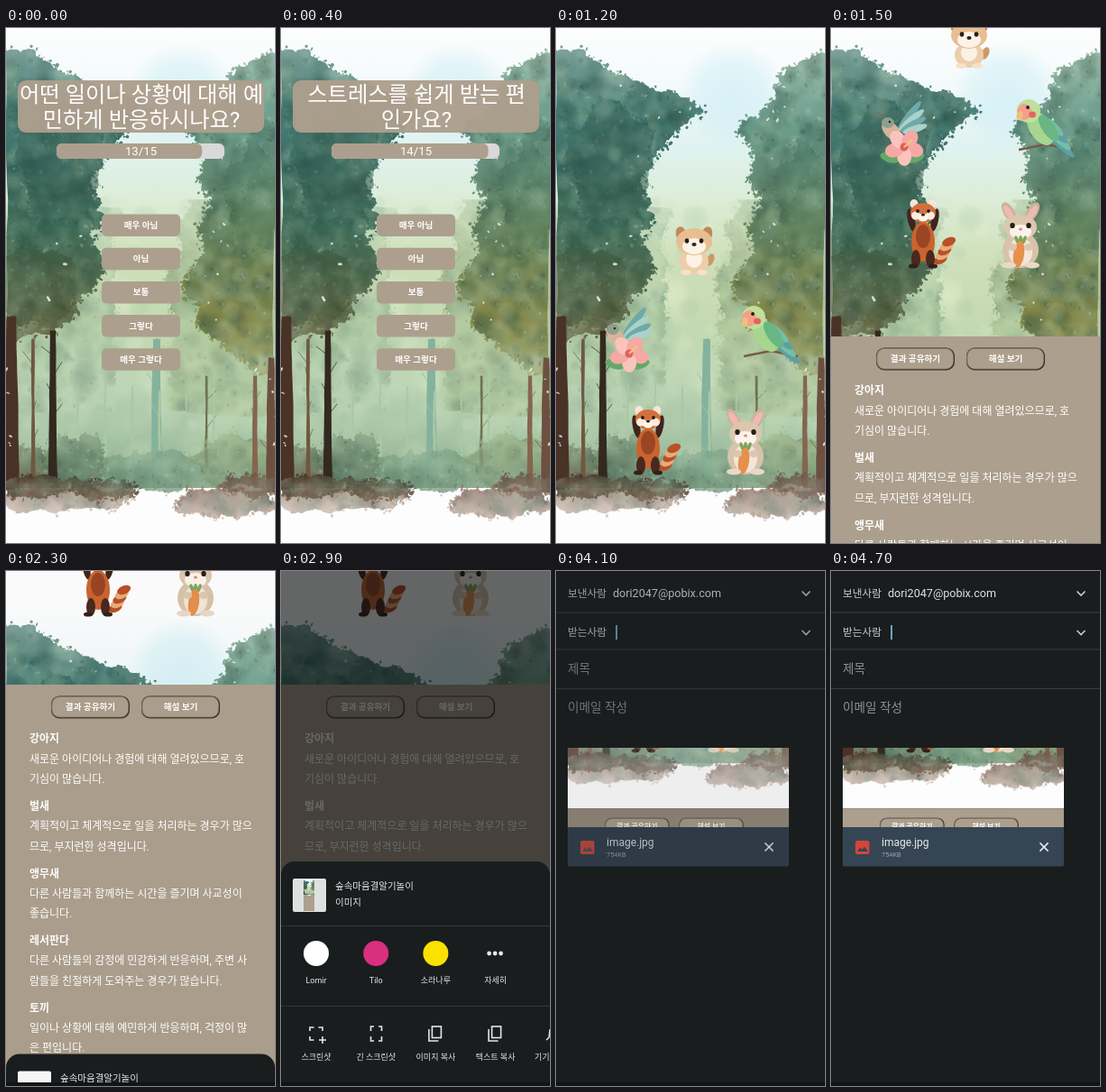
These frames come from a looping animation (298 by 571 pixels, 4800 ms). An HTML page with a canvas:

```html
<!DOCTYPE html>
<html lang="ko">
<head>
<meta charset="utf-8">
<style>
html, body { margin: 0; width: 100%; height: 100%; overflow: hidden; background: #fff; }
canvas { display: block; width: 298px; height: 571px; }
</style>
</head>
<body>
<canvas id="stage" width="298" height="571"></canvas>
<script>
const W = 298, H = 571, LOOP = 4800;
const stage = document.getElementById('stage').getContext('2d');
let g = stage;
const FONT = "Roboto, 'Noto Sans CJK KR', 'Noto Sans CJK', 'Noto Sans CJK JP', sans-serif";
const BEIGE = '#ad9f8d', DARK = '#191d1e', PAPER = '#fdfdfd';

let seed = 7;
function rnd(a = 0, b = 1) {
  seed = (seed + 0x6D2B79F5) | 0;
  let v = Math.imul(seed ^ (seed >>> 15), 1 | seed);
  v = (v + Math.imul(v ^ (v >>> 7), 61 | v)) ^ v;
  return a + (b - a) * (((v ^ (v >>> 14)) >>> 0) / 4294967296);
}
const pick = list => list[Math.floor(rnd(0, list.length))];
const clamp = v => Math.max(0, Math.min(1, v));
const inOut = p => p < .5 ? 2 * p * p : 1 - 2 * (1 - p) * (1 - p);
const bump = (y, mid, spread) => Math.exp(-(((y - mid) / spread) ** 2));

// drawing helpers
function box(x, y, w, h, r, fill) {
  g.fillStyle = fill;
  g.beginPath();
  g.roundRect(x, y, w, h, r);
  g.fill();
}
function oval(x, y, rx, ry, fill, rot = 0) {
  g.fillStyle = fill;
  g.beginPath();
  g.ellipse(x, y, rx, ry, rot, 0, 7);
  g.fill();
}
function pair(x, dx, y, rx, ry, fill, rot = 0) {
  oval(x - dx, y, rx, ry, fill, -rot);
  oval(x + dx, y, rx, ry, fill, rot);
}
function trace(pts) {
  g.beginPath();
  pts.forEach(([x, y]) => g.lineTo(x, y));
}
function line(pts, color, width = 1.6) {
  g.strokeStyle = color;
  g.lineWidth = width;
  trace(pts);
  g.stroke();
}
function shape(pts, fill) {
  g.fillStyle = fill;
  trace(pts);
  g.fill();
}
function text(s, x, y, size, color = '#fff', align = 'left', weight = 400) {
  g.font = `${weight} ${size}px ${FONT}`;
  g.textAlign = align;
  g.fillStyle = color;
  g.fillText(s, x, y + size * .36);
}
function gradient(y1, y2, colors) {
  const fill = g.createLinearGradient(0, y1, 0, y2);
  colors.forEach((c, i) => fill.addColorStop(i / (colors.length - 1), c));
  return fill;
}

// watercolour helpers
function rough(pts, amp, depth = 4) {
  for (let d = 0; d < depth; d++, amp *= .6) {
    pts = pts.flatMap((p, i) => {
      const q = pts[(i + 1) % pts.length];
      return [p, [(p[0] + q[0]) / 2 + rnd(-amp, amp), (p[1] + q[1]) / 2 + rnd(-amp, amp)]];
    });
  }
  return pts;
}
function soft(x, y, r, rgb, alpha) {
  const fill = g.createRadialGradient(x, y, 0, x, y, r);
  fill.addColorStop(0, `rgba(${rgb},${alpha})`);
  fill.addColorStop(.6, `rgba(${rgb},${alpha * .7})`);
  fill.addColorStop(1, `rgba(${rgb},0)`);
  oval(x, y, r, r, fill);
}
function wash(pts, colors, alpha = 1, amp = 5) {
  const edge = rough(pts, amp);
  const xs = pts.map(p => p[0]), ys = pts.map(p => p[1]);
  const x1 = Math.min(...xs), x2 = Math.max(...xs), y1 = Math.min(...ys), y2 = Math.max(...ys);
  const fill = gradient(y1, y2, colors);
  const count = (x2 - x1) * (y2 - y1) / 70;
  g.save();
  g.globalAlpha = alpha;
  shape(edge, fill);
  for (const [x, y] of edge) {
    if (rnd() < .4) oval(x + rnd(-4, 4), y + rnd(-4, 4), rnd(.5, 2.8), rnd(.5, 1.8), fill, rnd(0, 3));
  }
  trace(edge);
  g.clip();
  for (let i = 0; i < count; i++) {
    const x = rnd(x1, x2), y = rnd(y1, y2);
    soft(x, y, rnd(4, 16), pick(['22,62,58', '38,66,48', '190,215,190', '140,175,145']), rnd(.04, .2));
    if (i % 3 === 0) oval(x, y, rnd(.6, 3), rnd(.5, 2), pick(['rgba(20,60,55,.22)', 'rgba(200,222,200,.25)']), rnd(0, 3));
  }
  g.restore();
}
function blob(x, y, rx, ry) {
  return Array.from({ length: 14 }, (_, i) => {
    const a = i * Math.PI / 7, k = 1 + .14 * Math.sin(a * 5 + x);
    return [x + rx * k * Math.cos(a), y + ry * k * Math.sin(a)];
  });
}
// crown hanging in from one side; reach gives its width at each height
function crown(side, y1, y2, reach) {
  const pts = [[side, y1]];
  for (let y = y1; y <= y2; y += 9) pts.push([Math.abs(side - Math.max(0, reach(y))), y]);
  return [...pts, [side, y2]];
}
const dome = (y, y1, y2, round) =>
  Math.min(1, Math.sqrt(Math.max(0, y - y1) / round), Math.sqrt(Math.max(0, y2 - y) / round));
const leftReach = y => 100 * dome(y, 24, 350, 60) + 60 * bump(y, 95, 30) + 7 * Math.sin(y / 10);
const rightReach = y => 74 * dome(y, 26, 385, 80) + 22 * bump(y, 300, 60) + 14 * bump(y, 120, 35) + 7 * Math.sin(y / 9 + 2);

function trunk(x, y1, y2, w, color) {
  shape(rough([[x - w * .35, y1], [x + w * .35, y1], [x + w * .6, y2], [x - w * .6, y2]], 1), color);
  for (let y = y1 + 20; y < y2 - 40; y += rnd(18, 34)) {
    line([[x, y + 8], [x + rnd(-14, 14), y - rnd(2, 9)]], color, .7);
  }
}

function paintForest() {
  const sheet = document.createElement('canvas');
  sheet.width = W;
  sheet.height = H;
  g = sheet.getContext('2d');
  g.fillStyle = PAPER;
  g.fillRect(0, 0, W, H);
  g.fillStyle = gradient(0, 520, [PAPER, '#f3fafb', '#e0f3f1', '#dbecd6', '#cfdfb9', '#c3d9b2', '#bad3b2', '#a5c3a4', '#8ba68c']);
  g.fillRect(0, 0, W, 510);
  soft(195, 75, 60, '200,236,244', .6);
  for (let i = 0; i < 150; i++) {
    soft(rnd(0, W), rnd(190, 490), rnd(8, 26), pick(['240,246,215', '150,188,145', '200,224,190']), rnd(.08, .25));
  }

  // hazy far foliage
  wash(crown(0, 200, 430, y => leftReach(Math.min(y, 250)) + 22), ['#bdd6b4', '#a9c8a0', '#c2d8b8'], .45);
  wash(crown(W, 190, 430, y => rightReach(Math.min(y, 300)) + 24), ['#bfd3ab', '#a3ba86', '#bccfa2'], .5);

  // far and near trunks: place, top, width
  trunk(167, 345, 498, 11, '#84b29d');
  trunk(222, 385, 492, 4, '#6d7350');
  for (let i = 0; i < 6; i++) trunk(80 + 30 * i, rnd(370, 410), 475, 2.5, '#a9c8a6');

  wash(blob(75, 478, 36, 28), ['#8ba787', '#4f6a52'], .8);
  wash(blob(165, 492, 60, 22), ['#93b799', '#75997c'], .7);
  wash(blob(262, 482, 52, 32), ['#a3b88a', '#7f9a78'], .7);
  wash(blob(18, 485, 30, 22), ['#8f9c77', '#5d5a42'], .8);

  wash(crown(0, 25, 349, leftReach), ['#7ba199', '#4b8078', '#3a6c64', '#3c6a58', '#52694a', '#6d6a48']);
  wash(blob(60, 150, 48, 70), ['#2d5f5a', '#2f5a4c'], .5);
  wash(blob(30, 285, 48, 42), ['#3a5a42', '#55532f'], .5);
  wash(crown(W, 28, 384, rightReach), ['#9fc0b2', '#6c9e8e', '#648c74', '#728c60', '#828648', '#a0a870']);
  wash(blob(274, 190, 32, 62), ['#46786a', '#5d7a4c'], .45);

  trunk(6, 320, 512, 15, '#4a3226');
  trunk(30, 345, 505, 5, '#705840');
  trunk(52, 335, 505, 9, '#33291f');
  trunk(276, 385, 508, 6, '#846650');
  trunk(294, 365, 515, 9, '#6d5040');

  // torn lower edge and bare earth
  const foot = [[0, 600]];
  for (let x = 0; x <= W; x += 18) foot.push([x, 514 + 6 * Math.sin(x / 24)]);
  shape(rough([...foot, [W, 600]], 5), PAPER);
  wash(blob(60, 522, 80, 13), ['#9a7f6e', '#c9b6aa'], .75);
  wash(blob(42, 508, 62, 12), ['#4a382c', '#6b5342'], .85);
  wash(blob(112, 512, 34, 9), ['#4e5040', '#79604e'], .8);
  wash(blob(245, 526, 58, 17), ['#86695b', '#c9b0a6'], .75);
  wash(blob(276, 508, 38, 11), ['#6f5546', '#947769'], .75);

  for (let i = 0; i < 45; i++) {
    const y = rnd(60, 500), reach = i % 2 ? leftReach(y) : rightReach(y);
    const d = reach * rnd(.5, 1);
    oval(i % 2 ? d : W - d, y, rnd(.5, 2.6), rnd(.4, 1.6), 'rgba(243,249,245,.8)', rnd(0, 3));
  }
  return sheet;
}

// animals, each around its own centre
function dog() {
  oval(18, 14, 4, 7, '#c99a68', .4);
  oval(0, 16, 16, 14, '#ecceaa');
  oval(0, 13, 9, 10, '#fbf1e4');
  pair(0, 14, -14, 6, 9, '#c08a58', .3);
  oval(0, -6, 20, 15, '#e7bf92');
  oval(0, -1, 13, 9, '#fcf3e8');
  pair(0, 8, -7, 2.3, 2.7, '#2b1c16');
  oval(0, -3, 2.6, 1.9, '#33211b');
  pair(0, 9, 28, 6, 3, '#f6e2c8');
}
function hummingbird() {
  line([[-24, -26], [-14, -18]], '#7c6b5c', 1.2);
  for (let i = 0; i < 4; i++) oval(12 + i * 2, -22 + i * 5, 20 - i * 2, 4, i % 2 ? '#a9d2cb' : '#6fa9a8', -.9 + i * .2);
  oval(-8, -5, 13, 8, '#d6b49a', .8);
  oval(-12, -14, 7, 6, '#8f9f8c');
  oval(-10, -15, 1.2, 1.2, '#1d1d1d');
  pair(4, 14, 25, 11, 5, '#64a868', -.3);
  for (let i = 0; i < 5; i++) {
    const a = i * 1.257 + .3;
    oval(6 + 11 * Math.cos(a), 13 + 10 * Math.sin(a), 11, 8, i % 2 ? '#fac3bb' : '#f5a8a4', a);
  }
  oval(6, 13, 4.5, 4.5, '#dd6068');
  line([[6, 13], [15, 5]], '#f2cf6a', 2);
}
function parrot() {
  line([[-30, 22], [0, 16], [30, 22]], '#7a5b45', 2.5);
  for (let i = 0; i < 4; i++) oval(14 - i * 2, 14 - i * 6, 24 - i * 3, 4.5, i % 2 ? '#74bfa4' : '#5a9fa8', .75);
  oval(-6, -2, 12, 21, '#a8d690', -.55);
  oval(3, -2, 7, 17, '#69b684', -.6);
  oval(-19, -21, 13, 13, '#bfe09a');
  oval(-24, -20, 8, 9, '#f3a08a');
  oval(-29, -16, 3.5, 5, '#ecc07c', .3);
  oval(-15, -17, 4, 3.5, '#e6635d');
  oval(-20, -25, 1.9, 2.1, '#1f1c1c');
}
function panda() {
  for (let i = 0; i < 5; i++) oval(17 + 2.4 * i, 28 - 5 * i, 8, 4.5, i % 2 ? '#e9ac77' : '#b8502a', -.4);
  pair(-2, 13, -16, 4, 13, '#3f241d', .2);
  oval(-2, 8, 13, 22, '#c9642f');
  oval(-2, 2, 8, 13, '#9a4524');
  pair(-2, 8, 27, 5, 10, '#4a281d');
  pair(-2, 11, 35, 5, 2.6, '#33201b');
  pair(-2, 10, -34, 4.5, 5, '#f6e6d8');
  oval(-2, -24, 14, 11, '#d1703c');
  pair(-2, 8, -21, 5, 4.5, '#f9ecdf');
  oval(-2, -19, 5.5, 4.5, '#fdf4ea');
  pair(-2, 6, -26, 1.8, 2, '#241512');
  oval(-2, -22, 2, 1.5, '#241512');
}
function rabbit() {
  pair(0, 13, -27, 6, 12, '#cdb39a', .55);
  pair(0, 13, -26, 3.6, 9.5, '#f0b9b2', .55);
  oval(0, 15, 20, 20, '#d8c3aa');
  oval(0, 17, 13, 16, '#f2e6d8');
  oval(0, -10, 18, 14, '#dcc7ae');
  oval(0, -5, 12, 8, '#fbf3ea');
  pair(0, 9, -12, 2.7, 3.1, '#2a1b18');
  oval(0, -8, 2, 1.5, '#d98a86');
  for (const a of [-.4, 0, .4]) oval(a * 10, 4, 2, 5, '#7fa55c', a);
  oval(-2, 20, 6, 15, '#e6904c', .15);
  pair(0, 9, 12, 5, 4, '#dcc7ae');
  pair(0, 13, 32, 8, 3.6, '#ead9c6');
}
const animals = [[dog, 153, 243], [hummingbird, 75, 348], [parrot, 238, 342], [panda, 104, 458], [rabbit, 210, 460]];

const traits = [
  ['강아지', '새로운 아이디어나 경험에 대해 열려있으므로, 호', '기심이 많습니다.'],
  ['벌새', '계획적이고 체계적으로 일을 처리하는 경우가 많으', '므로, 부지런한 성격입니다.'],
  ['앵무새', '다른 사람들과 함께하는 시간을 즐기며 사교성이', '좋습니다.'],
  ['레서판다', '다른 사람들의 감정에 민감하게 반응하며, 주변 사', '람들을 친절하게 도와주는 경우가 많습니다.'],
  ['토끼', '일이나 상황에 대해 예민하게 반응하며, 걱정이 많', '은 편입니다.']
];
const quiz = [
  ['어떤 일이나 상황에 대해 예', '민하게 반응하시나요?'],
  ['스트레스를 쉽게 받는 편', '인가요?'],
  ['사소한 일을 할때도 걱정이', '많은 편인가요?']
];
const answers = ['매우 아님', '아님', '보통', '그렇다', '매우 그렇다'];
const forest = paintForest();
g = stage;

function quizPage(n, touch) {
  g.drawImage(forest, 0, 0);
  box(13, 58, 273, 58, 9, 'rgba(173,159,141,.96)');
  quiz[n].forEach((s, i) => text(s, 150, 73 + 28.5 * i, 24.3, '#fff', 'center'));
  box(56, 128, 186, 17, 6, '#dad8d8');
  box(56, 128, 186 * (13 + n) / 15, 17, 6, BEIGE);
  text(`${13 + n}/15`, 149.5, 136, 13.2, '#fff', 'center');
  answers.forEach((label, i) => {
    const y = 206.5 + 37.2 * i;
    box(106, y, 87, 24.5, 5, BEIGE);
    text(label, 149.5, y + 12, 9.6, '#fff', 'center', 700);
  });
  if (touch) {
    oval(172, 366, 8.5, 8.5, 'rgba(120,112,104,.25)');
    oval(172, 366, 7.5, 7.5, 'rgba(235,230,225,.5)');
  }
}

function resultPage(forestY) {
  g.fillStyle = PAPER;
  g.fillRect(0, 0, W, H);
  g.drawImage(forest, 0, forestY);
  for (const [animal, x, y] of animals) {
    g.save();
    g.translate(x, y);
    animal();
    g.restore();
  }
  g.fillStyle = BEIGE;
  g.fillRect(0, H, W, 600);
  ['결과 공유하기', '해설 보기'].forEach((label, i) => {
    const x = 50 + 100 * i;
    box(x, 583.5, 87, 25, 9, '#37332c');
    box(x, 583.5, 86, 24, 9, '#6d675b');
    box(x + 1.3, 584.8, 84, 22, 8, BEIGE);
    text(label, x + 43.5, 595.5, 9.6, '#fff', 'center', 700);
  });
  traits.forEach((rows, i) => rows.forEach((s, j) =>
    text(s, 26, 631 + 74.6 * i + 22.3 * j, 12, '#fff', 'left', j ? 400 : 700)));
}

function corners(x, y, w, h, color, open) {
  for (const sx of [-1, 1]) for (const sy of [-1, 1]) {
    if (open && sx + sy === 2) continue;
    line([[x + sx * 2.5, y + sy * h], [x + sx * w, y + sy * h], [x + sx * w, y + sy * 3]], color);
  }
}
function cross(x, y, r, color) {
  line([[x - r, y], [x + r, y]], color);
  line([[x, y - r], [x, y + r]], color);
}

function shareSheet(top, { ghost = false, thumb = true, press = false } = {}) {
  const ink = ghost ? '#2b3132' : '#e4e6e7', flat = '#212121';
  const column = i => 39 + 66.2 * i;
  g.save();
  g.translate(0, top);
  box(0, 0, W, 300, [15, 15, 0, 0], ghost ? '#181e20' : DARK);
  if (press) box(12, 72, 54, 86, 6, 'rgba(255,255,255,.08)');
  box(13, 19, 37, 37, 2, ghost ? flat : thumb ? '#dfe1e0' : '#f6f6f6');
  if (thumb && !ghost) {
    g.drawImage(forest, 25, 20, 12, 19);
    box(25, 38, 12, 17, 0, BEIGE);
  }
  text('숲속마음결알기놀이', 60, 27, 10.5, ink);
  text('이미지', 60, 45, 10.5, ink);
  for (const y of [71, 160]) box(0, y, W, 1, 0, ghost ? '#23292b' : '#34383a');
  if (ghost) box(12, 72, 54, 90, 0, flat);
  ['#ffffff', '#d92f80', '#fae100'].forEach((c, i) => oval(column(i), 102, 14, 14, ghost ? flat : c));
  for (const i of [-1, 0, 1]) oval(column(3) - .5 + 6.5 * i, 102, 2.4, 2.4, ink);
  ['Lomir', 'Tilo', '소라나루', '자세히'].forEach((s, i) => {
    if (!ghost || i) text(s, column(i), 132, 9, ink, 'center');
  });
  corners(39, 191, 7, 7, ink, true);
  cross(46, 198, 4, ink);
  corners(105.5, 191, 6, 8, ink);
  for (const x of [column(2), column(3)]) {
    g.strokeRect(x - 4, 183, 10, 12.5);
    line([[x - 7.5, 186], [x - 7.5, 199], [x + 3, 199]], ink);
  }
  line([[294, 198], [297, 195], [298, 186]], ink);
  ['스크린샷', '긴 스크린샷', '이미지 복사', '텍스트 복사', '기기 간 공유'].forEach((s, i) =>
    text(s, column(i), 217, 9, ink, 'center'));
  g.restore();
  if (!ghost) box(0, 567, W, 4, 0, '#121516');
}

function compose(alpha) {
  const label = '#c9cccd', bright = '#e6e9eb', bar = '#364553';
  box(0, 0, W, H, 0, DARK);
  box(0, 567, W, 4, 0, '#121516');
  g.save();
  g.globalAlpha = alpha;
  ['보낸사람', '받는사람'].forEach((s, i) => {
    const y = 24.5 + 43.5 * i;
    text(s, 13, y, 11.7, label);
    line([[272.5, y - 2], [277, y + 2.5], [281.5, y - 2]], label);
  });
  text('dori2047@pobix.com', 63, 24.5, 12.6, '#dfe2e3');
  box(66, 60, 2, 16, 0, '#6ba6c8');
  for (const y of [45.5, 86.5, 130]) box(0, y, W, 1, 0, '#3a3e40');
  text('제목', 13, 108.5, 13.6, '#8f9395');
  text('이메일 작성', 13, 151, 13.6, '#8f9395');

  g.save();
  g.beginPath();
  g.rect(13, 196, 245, 88);
  g.clip();
  g.translate(13, 196);
  g.scale(.822, .822);
  g.translate(0, -489);
  resultPage(0);
  g.restore();
  box(13, 284, 245, 43.5, [0, 0, 2, 2], bar);
  box(27, 299, 15.5, 15, 2, '#d2473a');
  shape([[29, 311], [32.5, 306.5], [34.5, 309], [37, 305.5], [41, 311]], bar);
  text('image.jpg', 56, 301, 12, bright);
  text('754KB', 56, 314, 7.4, '#98a3ac');
  g.translate(236, 306);
  g.rotate(Math.PI / 4);
  cross(0, 0, 6.5, bright);
  g.restore();
}

function scrollAt(t) {
  if (t < 1500) return 229 * clamp((t - 1200) / 300) ** 1.4;
  return 229 + 216 * (1 - (1 - clamp((t - 1500) / 400)) ** 2);
}

function results(t) {
  const s = scrollAt(t);
  g.save();
  g.translate(0, -s);
  resultPage(s + Math.max(0, (s - 229) / 6));
  g.restore();
  const up = inOut(clamp((t - 2180) / 450));
  if (!up) return;
  const down = clamp((t - 3100) / 300);
  box(0, 0, W, H, 0, `rgba(8,10,10,${.62 * up * up})`);
  shareSheet(H - 249 * up + 101 * down, { thumb: t >= 2500, press: t >= 3000 });
  box(0, 0, W, H, 0, `rgba(33,33,33,${down})`);
}

function draw(t) {
  if (t < 1200) {
    quizPage(t < 400 ? 0 : t < 700 ? 1 : 2, t > 0 && t % 300 === 0);
  } else if (t < 3400) {
    results(t);
  } else if (t < 3500) {
    box(0, 0, W, H, 0, '#212121');
    shareSheet(423, { ghost: true });
  } else {
    compose(clamp((t - 3800) / 400));
  }
}

let shown = -1;
const start = performance.now();
function tick() {
  const t = Math.floor((performance.now() - start) % LOOP / 100) * 100;
  if (t !== shown) draw(shown = t);
  requestAnimationFrame(tick);
}
draw(shown = 0);
requestAnimationFrame(tick);
</script>
</body>
</html>
```
